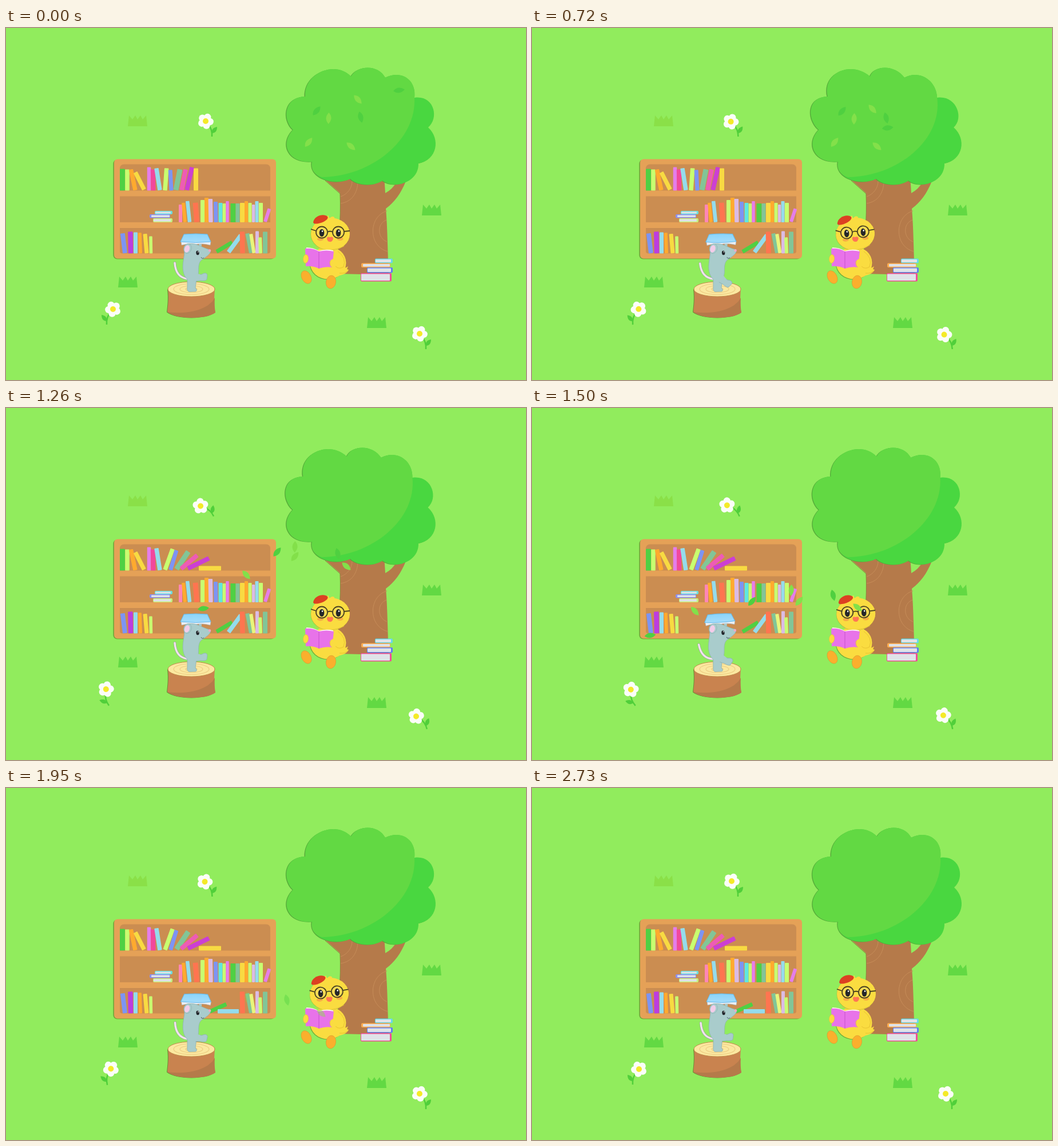
An HTML page with a canvas for the animation above (2910 ms loop, 909x616 px).

```html
<!DOCTYPE html>
<html lang="en">
<head>
<meta charset="utf-8">
<title>Reading under the tree</title>
<style>
  html, body { margin: 0; width: 100%; height: 100%; overflow: hidden; background: #91ec5d; }
  canvas { display: block; width: 100%; height: 100%; }
</style>
</head>
<body>
<canvas id="stage" width="909" height="616"></canvas>
<script>
const ctx = document.getElementById('stage').getContext('2d');
const LOOP = 2910, STEP = 30, LAST = 2730;
const GREEN = '#62d943', YELLOW = '#fadc40', FUR = '#a9cccc', FUR_EDGE = '#8db3b4';
const COLORS = {
  g: '#4fd043', l: '#c8ff70', o: '#ffaa2e', y: '#f8da42', v: '#e57dea', p: '#f2489c',
  c: '#94dcec', b: '#7d94f4', t: '#82c597', k: '#ee5bb5', m: '#cc3fd3', u: '#bd3ce0',
  r: '#ff7550', w: '#dbbbe4', a: '#5fe8e0', s: '#ff86b6', e: '#e8f57c'
};

// Time helpers
const clamp = x => Math.max(0, Math.min(1, x));
const mix = (a, b, p) => a + (b - a) * p;
const ease = p => (1 - Math.cos(Math.PI * clamp(p))) / 2;

function keyed(t, keys) {
  const i = keys.findIndex(k => k[0] > t);
  if (i === 0) return keys[0][1];
  if (i < 0) return keys[keys.length - 1][1];
  const [t0, a] = keys[i - 1], [t1, b] = keys[i];
  return mix(a, b, ease((t - t0) / (t1 - t0)));
}

// Smooth curve through timed values, at rest at both ends
function spline(t, times, values) {
  const n = times.length - 1;
  if (t <= times[0]) return values[0];
  if (t >= times[n]) return values[n];
  const i = times.findIndex(x => x > t) - 1;
  const slope = j => j === 0 || j === n ? 0
    : (values[j + 1] - values[j - 1]) / (times[j + 1] - times[j - 1]);
  const d = times[i + 1] - times[i], p = (t - times[i]) / d, q = 1 - p;
  return values[i] * (1 + 2 * p) * q * q + slope(i) * d * p * q * q
    + values[i + 1] * p * p * (3 - 2 * p) - slope(i + 1) * d * p * p * q;
}

// Drawing helpers
function group(draw, x = 0, y = 0, degrees = 0, sx = 1) {
  ctx.save();
  ctx.translate(x, y);
  ctx.rotate(degrees * Math.PI / 180);
  ctx.scale(sx, 1);
  draw();
  ctx.restore();
}
const pivot = (x, y, degrees, draw) =>
  group(() => { ctx.translate(-x, -y); draw(); }, x, y, degrees);

function shape(d, fill, stroke, width = 1) {
  const path = new Path2D(d);
  if (fill) { ctx.fillStyle = fill; ctx.fill(path); }
  if (stroke) { ctx.strokeStyle = stroke; ctx.lineWidth = width; ctx.stroke(path); }
}
function oval(x, y, rx, ry, fill, degrees = 0, stroke, width = 1) {
  ctx.beginPath();
  ctx.ellipse(x, y, rx, ry, degrees * Math.PI / 180, 0, 7);
  if (fill) { ctx.fillStyle = fill; ctx.fill(); }
  if (stroke) { ctx.strokeStyle = stroke; ctx.lineWidth = width; ctx.stroke(); }
}
function box(x, y, w, h, fill, r = 0) {
  ctx.fillStyle = fill;
  ctx.beginPath();
  ctx.roundRect(x, y, w, h, r);
  ctx.fill();
}

// Scenery
function grass(x, y, fill = GREEN) {
  group(() => shape('M-17 10L-15-9-9-2-4-9 0-2 5-9 9-2 15-9 17 10Z', fill), x, y);
}

function flower(x, y, side, px, angle) {
  pivot(x + px, y + 21, angle, () => group(() => {
    shape('M4 5Q12 14 11 27', null, '#50cf3a', 2.5);
    shape('M11 21C10 14 14 11 20 10C20 17 17 21 11 21Z', '#50cf3a');
    for (let i = 0; i < 5; i++) {
      const a = (i * 72 - 65) * Math.PI / 180;
      oval(7.7 * Math.cos(a), 7.7 * Math.sin(a), 6.2, 6.2, '#fbfdf8');
    }
    oval(0, 0, 5, 5, '#f4ea28');
  }, x, y, 0, side));
}

function trunk() {
  shape('M558 266L584 289C586 330 581 390 576 430L669 432C667 390 667 350 664 316C680 304 690 290 699 268L683 269Q676 282 663 289L661 258H560Z', '#b57a4a');
  shape('M558 267L584 290C586 330 581 390 576 430', null, '#8f7f3c', 1);
  shape('M585 307C605 304 615 288 615 268M585 295C597 291 605 280 605 268M666 320C633 330 633 382 667 391M665 336C648 342 649 368 666 374', null, '#c78d59', 1);
}

function crown(sway) {
  const bend = d => d.replace(/([\d.]+) ([\d.]+)/g, (_, x, y) =>
    `${+x - sway * .001 * Math.max(0, 205 - y) ** 2} ${y}`);
  const top = 'M502 178C483 160 486 121 523 120C521 77 578 57 603 85C615 64 651 64 663 87C690 73 718 90 714 122';
  const left = 'C494 237 478 203 502 178Z';
  const whole = bend(top + 'C748 117 758 157 738 174C760 194 754 231 721 237C722 270 679 283 658 267C645 277 615 277 602 264C575 277 530 264 535 234' + left);
  group(() => shape(whole, '#58aa3a'), -1.5, .6);
  shape(whole, '#49d740');
  shape(bend(top + 'C718 195 640 260 552 261C536 255 533 245 535 234' + left), GREEN);
}

// Leaves: angle, colour, start time, vanishing time, x and y at the four path points
const DARK = '#4fd040', LIGHT = '#83e04a';
const leaves = [
  [-8, DARK, 380, 1810, [687, 532, 345, 130], [109, 250, 351, 419]],
  [-50, DARK, 640, 1830, [543, 526, 474, 326], [145, 165, 252, 390]],
  [48, LIGHT, 496, 1920, [615, 543, 420, 202], [125, 186, 292, 388]],
  [92, LIGHT, 640, 2010, [564, 549, 505, 421], [158, 177, 243, 366]],
  [76, DARK, 629, 2060, [620, 609, 580, 491], [156, 179, 255, 371]],
  [-52, LIGHT, 790, 1950, [529, 526, 505, 442], [200, 205, 260, 388]],
  [40, LIGHT, 760, 2080, [603, 603, 595, 551], [207, 218, 277, 394]]
];
function fallingLeaves(t) {
  for (const [angle, fill, start, end, xs, ys] of leaves) {
    const times = [start, 960, 1260, 1740];
    ctx.globalAlpha = clamp((end - t) / 280);
    group(() => shape('M-10 0Q-1-9 10 0Q0 9-10 0Z', fill), spline(t, times, xs), spline(t, times, ys), angle);
  }
  ctx.globalAlpha = 1;
}

// Books: colour, base centre, height, width, lean [, final base, final lean, fall exponent]
const topRow = [
  ['g', 203.5, 38, 9, 0], ['l', 212, 37, 7.5, 0], ['o', 226, 37, 7.5, -12], ['y', 241.5, 34, 7.5, -27],
  ['v', 250, 41, 6.5, 0], ['p', 257.5, 37, 8, -1], ['c', 269, 39, 7.5, -9],
  ['l', 278, 39, 7.5, 4, 278, 20, 3], ['b', 289, 36, 7, -3, 287.5, 17, 3],
  ['t', 297, 37, 9, 11, 298, 34, .7], ['k', 307, 37, 8, 11, 306, 50, 1.1],
  ['m', 316, 41, 8, 13, 318, 64, 1.4], ['y', 332, 39, 8, 0, 337, 90, 2]
];
const middleRow = [
  ['s', 305, 31, 6, 0], ['o', 313, 34, 6, -5], ['c', 321, 37, 6.5, -6], ['r', 333.5, 34, 9, -4],
  ['l', 343.5, 39, 7, 0], ['o', 350.5, 43, 7, 0], ['w', 358, 41, 7.5, -1], ['b', 367, 36, 7, -1],
  ['a', 375, 34, 7, 0], ['l', 381.5, 33, 5.5, 0], ['v', 387, 37, 5.5, 0], ['g', 397, 33, 9, 0],
  ['t', 405, 33, 7, 0], ['y', 413, 34, 8, 0], ['o', 420, 37, 6, 0], ['l', 426.5, 34, 6, 0],
  ['w', 432.5, 31, 5, 0], ['c', 438.5, 37, 6, 0], ['l', 445.5, 34, 7, 0], ['v', 453, 24, 6, 18]
];
const bottomRow = [
  ['b', 208, 35, 8, -7], ['u', 218, 38, 8.5, -1], ['c', 226.5, 37, 7, 0], ['o', 235, 36, 6, -2],
  ['y', 246, 34, 7, -5], ['l', 253.5, 30, 5.5, -1],
  ['g', 368, 32, 7, 59, 356, 66, 1.8], ['c', 389, 37, 7.5, 36, 370, 90, 1.8],
  ['r', 413.5, 38, 8.5, -1], ['t', 428.5, 35, 7, -11], ['e', 433.5, 34, 6, -9],
  ['w', 439, 39, 6, 0], ['l', 445, 28, 6, -2], ['t', 453, 38, 8, 0]
];
function bookRow(row, floor, fall) {
  for (const [color, x, h, w, lean, endX = x, endLean = lean, power = 1] of row) {
    const p = fall ** power, a = mix(lean, endLean, p);
    const lift = Math.abs(Math.sin(a * Math.PI / 180)) * w / 2;
    group(() => box(-w / 2, -h, w, h, COLORS[color], 1), mix(x, endX, p), floor - lift, a);
  }
}
function lyingBook(x, y, w, h, cover, side = 1) {
  box(x, y, w, h, cover, 2);
  box(side > 0 ? x + 1 : x + 3, y + 1.5, w - 4, h - 3, '#dfe3e8', 1);
}

function bookcase(t) {
  box(187.3, 230.5, 283, 174, '#74a43b', 7);
  box(189, 229.5, 283, 174, '#e5a157', 6);
  box(199, 238.5, 263, 46, '#cb8d51', [7, 7, 0, 0]);
  box(199, 294.5, 263, 45.5, '#cb8d51');
  box(199, 350, 263, 44.5, '#cb8d51', [0, 0, 4, 4]);
  bookRow(topRow, 284.5, clamp((t - 870) / 300));
  lyingBook(257, 333, 34, 7, '#c8f080');
  lyingBook(251, 326, 36, 6.5, '#8c8ff0', -1);
  lyingBook(260, 320, 31, 6, '#6edfe0');
  bookRow(middleRow, 340, 0);
  bookRow(bottomRow, 394.5, clamp((t - 1600) / 300));
}

function stump() {
  const side = 'M283 457C285 474 283 486 282 497C298 510 350 510 366 498C363 486 364 472 365 457Z';
  group(() => shape(side, '#668c35'), -1, .5);
  shape(side, '#c9834f');
  shape('M282 497C320 502 355 492 365 472Q364 486 366 498C350 510 298 510 282 497Z', '#b57a4a');
  oval(324, 457, 41, 13, '#fbe8a0', 0, '#c08a48', 1);
  for (const [rx, ry] of [[31, 9.5], [20, 6], [10, 3]]) oval(324, 457, rx, ry, null, 0, '#eccb82', 1.2);
}

function mouse(tilt, foot) {
  pivot(324, 458, 1.6 * tilt, () => {
    pivot(317, 438, 10 * tilt, () => {
      ctx.lineCap = 'round';
      const tail = 'M317 439C303 437 296 427 295 411';
      shape(tail, null, '#9aab9c', 4.6);
      shape(tail, null, '#f3e3ee', 3.2);
    });
    shape('M325 386L322 378M339 384L340 376', null, FUR, 5);
    pivot(331, 376, 3.5 * tilt, () => group(() => {
      shape('M306 374L307 380Q323 376 331 379Q341 376 357 380L358 374Z', '#eceff3', '#a8b7c5', .6);
      const blue = ctx.createLinearGradient(0, 361, 0, 375);
      blue.addColorStop(0, '#8bd5fb');
      blue.addColorStop(1, '#a4dcfa');
      shape('M311 361Q332 359 352 361L358 374Q332 377 305 374Z', blue, '#62b9ec', 1);
    }, 3 * tilt));
    shape('M311 384C312 377 326 376 333 379C342 382 350 387 357 388C360 394 350 400 345 404C339 407 338 411 337 416C336 425 338 432 333 438L331 455Q335 458 332 461L320 461.5Q316 460 317 454L317 440C309 432 308 420 310 408C311 399 313 394 311 384Z', FUR, FUR_EDGE, .8);
    pivot(327, 436, 72 * (1 - foot), () => {
      shape('M325 428L339 431Q342 432 344 430Q350 427 352 432L351 440Q349 443 340 442L326 444Z', FUR);
      shape('M339 431Q342 432 344 430Q350 427 352 432L351 440Q349 443 340 442L332 443', null, FUR_EDGE, .8);
    });
    oval(317.5, 386, 6.6, 8.6, FUR, 18, FUR_EDGE, .8);
    oval(316.5, 386.5, 4.4, 6.5, '#f3cce9', 18);
    oval(335, 393.5, 2.7, 3.8, '#22262b', -5);
    oval(335.8, 391.8, .8, 1, '#fff');
    oval(356, 389.5, 2.2, 2.2, '#f4a5c4');
    shape('M341 401Q343 405 346 402', null, '#4d6163', 1);
  });
}

function chick(nod, turn) {
  const edge = '#e9c332';
  group(() => oval(563, 412, 31, 28, '#6eaa38'), -1.2, .5);
  shape('M580 416Q592 423 598 417L596 422 599 423Q595 432 578 434Z', YELLOW);
  oval(563, 411, 31.5, 28.5, YELLOW);
  shape('M580 391Q596 402 590 418Q582 423 576 417', null, edge, 1);
  shape('M583 429Q593 430 597 425', null, edge, 1);
  oval(525, 436, 8, 12, '#fbaf2d', -28, '#d79a2e', .7);
  oval(568, 444.5, 8.5, 11.5, '#fbaf2d', 10, '#d79a2e', .7);

  pivot(565, 386, -4.3 * nod, () => {
    shape('M558 336Q557 330 564 328Q564 332 566 333Q569 328 574 331L573 337Z', YELLOW);
    oval(566.5, 361, 34, 28.5, '#a9bd3b');
    oval(567, 360.5, 34, 28.5, YELLOW);
    shape('M541 383Q565 394 591 382', null, edge, .8);
    oval(549.5, 369.5, 5.5, 3, '#f6ad45');
    oval(584, 369, 5.5, 3, '#f6ad45');
    shape('M537 340C539 328 556 324 562 330C566 336 546 345 538 342Z', '#dc4122');
    for (const x of [552, 581]) {
      oval(x, 357.5, 10, 10, '#f8dc54', 0, '#4a4221', 1.8);
      oval(x, 358.5, 4.3, 6.6, '#252729');
      oval(x + 1, 355.5, 1.2, 1.6, '#fff');
    }
    shape('M562 357Q566.5 354.5 571 357M542 355L533 352M591 356L601 355', null, '#4a4221', 1.8);
    shape('M561 369Q561 364 566 366Q572 364 572 369Q570 375 566 374Q562 374 561 369Z', '#ff7655');
  });

  const x = 523 + 4.5 * turn, dy = 2 * turn;
  shape(`M${x + 2} 384Q537 384 547 390Q559 386 572 389L571 396H${x + 1}Z`, '#fff3ee');
  shape(`M${x} ${386 + dy}Q537 385 547 391V421Q536 416 ${x + 1} ${417 + dy}Z`, '#e873e9');
  shape('M547 391Q560 388 573 391L570 419Q558 417 547 421Z', '#e873e9');
  shape('M547 391V421', null, '#c653cb', 1);
  oval(x + 1, 404, 4.5, 7.5, YELLOW, 5, edge, .7);
  oval(572, 412, 5.5, 7.5, YELLOW, -10);
  shape('M567 407Q564 412 569 419', null, edge, .8);
}

function bookPile() {
  lyingBook(645, 403.5, 31, 8, '#67d8e6');
  lyingBook(621, 411.5, 51, 7.5, '#fbab4f', -1);
  lyingBook(631, 419, 45, 9.5, '#5f7df0');
  lyingBook(620, 429, 54, 14.5, '#f04e96');
}

const tiltKeys = [[0, 0], [120, -1], [260, 1], [390, .4], [540, -1], [960, 1], [1260, 0],
  [1400, -1], [1740, 1], [2000, 0], [2220, -1], [2500, 1], [2730, 0]];
const footKeys = [[0, 1], [120, .8], [260, 0], [390, .8], [540, .8], [960, 0], [1260, 1],
  [1400, .8], [1740, 0], [2000, 1], [2220, .8], [2500, 0], [2730, 1]];

function render(t) {
  box(0, 0, 909, 616, '#91ec5d');
  grass(230, 162, '#8ae048');
  grass(213, 444);
  grass(744, 318);
  grass(648, 515);
  flower(349, 163, 1, 11.5, keyed(t, [[540, 0], [1300, -30], [2160, 0]]));
  flower(187, 492, -1, -6, keyed(t, [[600, 0], [1480, -38], [2190, 0]]));
  flower(723, 535, 1, 11.5, keyed(t, [[420, 0], [1140, -19], [2000, 0]]));
  bookcase(t);
  stump();
  mouse(keyed(t, tiltKeys), keyed(t, footKeys));
  trunk();
  crown(keyed(t, [[120, 0], [930, 1], [1600, 0]]));
  bookPile();
  chick(keyed(t, [[120, 0], [360, 1], [850, 1], [1150, 0], [1400, 0], [1640, 1], [2300, 1], [2560, 0]]),
    keyed(t, [[2080, 0], [2220, 1], [2420, 0]]));
  fallingLeaves(t);
}

function tick() {
  const t = performance.now() % LOOP;
  render(Math.min(LAST, Math.floor(t / STEP) * STEP));
  requestAnimationFrame(tick);
}
tick();
</script>
</body>
</html>
```
